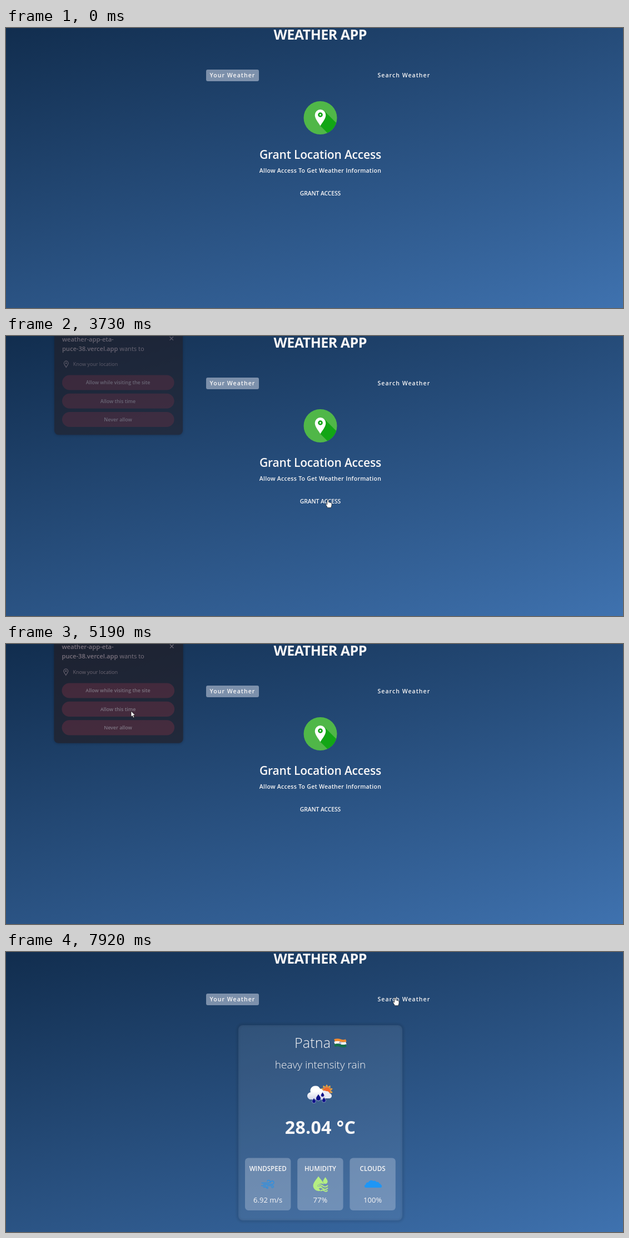
Write an HTML page that moves like this. It is 1110x505 px and loops after 8 s.

```html
<!DOCTYPE html>
<html lang="en">
<head>
<meta charset="utf-8">
<title>Weather App</title>
<style>
  html, body { margin: 0; width: 100%; height: 100%; overflow: hidden; }
  body { background: linear-gradient(160deg, #112d4e 0%, #3f72af 100%); }
  svg { display: block; width: 100%; height: 100%; }
  text { font-family: "Open Sans", "Noto Sans", sans-serif; fill: #f9f7f7; white-space: pre; }
  .mid { text-anchor: middle; }
  .light { font-weight: 300; }
  .semi { font-weight: 600; }
  .bold { font-weight: 700; }
  .tab { font-size: 10.5px; letter-spacing: 1.05px; }
  .stat { font-size: 11.6px; }
  .value { font-size: 13px; }
  #popup text { fill: #f0d6de; }
  #popup .ask { font-size: 11.5px; }
  #popup .choice { font-size: 9.2px; }
</style>
</head>
<body>
<svg viewBox="0 0 1110 505" preserveAspectRatio="none">
  <defs>
    <clipPath id="disc"><circle cx="565.5" cy="162" r="30"/></clipPath>
    <linearGradient id="cloudShade" x2="0" y2="1">
      <stop offset=".4" stop-color="#fff"/><stop offset="1" stop-color="#cfd3e6"/>
    </linearGradient>
    <filter id="soft" x="-10%" y="-10%" width="120%" height="120%"><feGaussianBlur stdDeviation="2"/></filter>
    <path id="drop" d="M0-5C1.500-2 4 0 4 2.200A4 4 0 0 1-4 2.200C-4 0-1.500-2 0-5Z"/>
  </defs>

  <text class="mid bold" x="565.3" y="20.800" font-size="25" letter-spacing="-.5">WEATHER APP</text>
  <rect x="360" y="75" width="95" height="21" rx="3" fill="#dbe2ef" fill-opacity=".5"/>
  <text class="tab semi" x="366.500" y="89">Your Weather</text>
  <text class="tab semi" x="668.500" y="89">Search Weather</text>

  <g id="grant">
    <circle cx="565.5" cy="162" r="30" fill="#50b748"/>
    <path clip-path="url(#disc)" fill="#12a615" d="M572.500 149.500 605 182 585 196 565.500 176.500Z"/>
    <path fill="#fff" d="M565.500 176.500C562 170.500 555.700 164 555.700 156.800A9.800 9.800 0 0 1 575.300 156.800C575.300 164 569 170.500 565.500 176.500Z"/>
    <circle cx="565.5" cy="156.500" r="2.900" fill="#fff" stroke="#12a615" stroke-width="2.800"/>
    <text class="mid semi" x="565.5" y="235.500" font-size="21" letter-spacing="-.18">Grant Location Access</text>
    <text class="mid semi" x="565.5" y="261" font-size="10.500" letter-spacing=".28">Allow Access To Get Weather Information</text>
    <text class="mid semi" x="565.5" y="302" font-size="10.400" letter-spacing="-.1">GRANT ACCESS</text>
  </g>

  <g id="loading">
    <g id="rings" fill="none"></g>
    <text class="mid semi" x="565.5" y="255.500" font-size="11.500" letter-spacing=".15">LOADING</text>
  </g>

  <g id="card">
    <rect x="417" y="131" width="297" height="354" rx="9" fill="none" stroke="#001" stroke-opacity=".16" stroke-width="3" filter="url(#soft)"/>
    <rect x="418" y="132" width="295" height="352" rx="8" fill="#dbe2ef" fill-opacity=".09"/>
    <text class="light" x="519" y="173" font-size="25" letter-spacing=".2">Patna</text>
    <g id="flag" fill="none" stroke-width="4.700"></g>
    <circle cx="601" cy="164.300" r="1.700" fill="none" stroke="#3b3f9a" stroke-width=".8"/>
    <text class="mid light" x="565.5" y="209.500" font-size="19">heavy intensity rain</text>

    <g id="sun" fill="#f2a33c"></g>
    <circle cx="577" cy="250" r="6.800" fill="#ee6a2c" stroke="#f7b04c"/>
    <path fill="#e9ebf5" d="M567 264a5 5 0 0 1 0-10 6 6 0 0 1 9-3 5.500 5.500 0 0 1 6 4 4.500 4.500 0 0 1-1 9Z"/>
    <path fill="url(#cloudShade)" d="M549 266a6.500 6.500 0 0 1-1-13 8.500 8.500 0 0 1 8-11.500 8.500 8.500 0 0 1 9 5 6.500 6.500 0 0 1 6 6.500 6.500 6.500 0 0 1-5 13Z"/>
    <g fill="#0b0f86" stroke="#fff" stroke-width=".5">
      <use href="#drop" transform="translate(554 267.500) scale(.85)"/>
      <use href="#drop" transform="translate(562 261.500) scale(1.100)"/>
      <use href="#drop" transform="translate(572 266) scale(.85)"/>
      <use href="#drop" transform="translate(569.500 256.500) scale(.75)"/>
    </g>
    <text class="mid bold" x="565.5" y="327.500" font-size="32" letter-spacing=".35">28.04 °C</text>

    <g id="stats"></g>
    <g fill="none" stroke="#2f8fdf" stroke-width="1.300" stroke-linecap="round">
      <path d="M460 416.500h12.500a2.500 2.500 0 1 0-2.500-2.600M463 419h16a3 3 0 1 0-3-3.200M459.500 421.500h8M470 421.500h9.500a1.800 1.800 0 1 1-1.800 2M463 424h7a1.300 1.300 0 1 1-1.300 1.400"/>
    </g>
    <g fill="#b4ee82">
      <path d="M562 404.500C565 409 571 414.500 572 419.500 568 416 563.500 418.500 560.500 420.500V423C563 423 566 420.500 569 423L562 425.500 566 430.500A10 10 0 0 1 552.500 422C552.500 415.500 559 409.500 562 404.500Z"/>
      <path d="M574.500 406C576 409 578.700 411 578.700 414A4.200 4.200 0 0 1 570.300 414C570.300 411 573 409 574.500 406Z"/>
      <path fill="none" stroke="#b4ee82" stroke-width="2" d="M561 422q4.500-4 9 0t9-1M561 426.500q4.500-4 9 0t9-1M566 431q3.500-3 6.500-.5t6-.5"/>
    </g>
    <path fill="#1e96f5" d="M647 425a2.800 2.800 0 0 1 .2-5.500 4 4 0 0 1 4.800-4 5.500 5.500 0 0 1 8.500-2.500 4.500 4.500 0 0 1 6 2 3.500 3.500 0 0 1 5 2.500 3 3 0 0 1 3 2.500 2.600 2.600 0 0 1-.5 5Z"/>
  </g>

  <g id="popup">
    <g id="panel">
      <rect x="82.500" y="-30" width="240" height="212.800" rx="8" fill="#000" opacity=".3" filter="url(#soft)"/>
      <rect x="83" y="-30" width="239" height="211.500" rx="8" fill="#231a1d"/>
    </g>
    <g id="content">
      <text class="ask semi" x="97.500" y="7">weather-app-eta-</text>
      <text class="ask" x="97.500" y="24.700"><tspan class="semi">puce-38.vercel.app</tspan> wants to</text>
      <path d="M297.700-1.500l6.600 6.600m0-6.600l-6.600 6.600" stroke="#e3ccd4" stroke-width="1.100"/>
      <path d="M105 55.500C103.500 52.500 101 50.500 101 47.800A4 4 0 0 1 109 47.800C109 50.500 106.500 52.500 105 55.500Z" fill="none" stroke="#d9c2ca" stroke-width="1.100"/>
      <circle cx="105" cy="47.800" r="1.300" fill="#d9c2ca"/>
      <text x="118" y="53.200" font-size="9.300" opacity=".85">Know your location</text>
      <g id="choices"></g>
    </g>
  </g>

  <g id="cursor" stroke="#111" stroke-linejoin="round" fill="#fff">
    <path id="arrow" stroke-width=".7" d="M0 0V10.300L2.400 8.200 4.100 12 5.800 11.200 4.200 7.600H7.400Z"/>
    <path id="hand" stroke-width=".7" d="M-1.300 1.200Q0-.8 1.300 1.200V5Q2.800 4.100 3.400 5.400 4.800 4.700 5.300 6 7 5.500 7 7.400V10.500Q6.500 12.500 5.600 14.700H-.6Q-1.500 12.300-3.600 9.500-4.300 7.700-2.700 7.800L-1.300 9Z"/>
  </g>
</svg>
<script>
const LOOP = 8000;
const $ = id => document.getElementById(id);
const clamp = v => Math.max(0, Math.min(1, v));
const show = (id, on) => $(id).setAttribute("display", on ? "inline" : "none");

function add(parent, name, attrs, text = "") {
  const el = document.createElementNS("http://www.w3.org/2000/svg", name);
  for (const key in attrs) el.setAttribute(key, attrs[key]);
  el.textContent = text;
  return $(parent).appendChild(el);
}

["Allow while visiting the site", "Allow this time", "Never allow"].forEach((label, i) => {
  const y = 70 + i * 34.4;
  add("choices", "rect", { x: 97.5, y, width: 208.5, height: 28, rx: 14, fill: "#723145" });
  add("choices", "text", { class: "mid choice semi", x: 201.5, y: y + 17.4 }, label);
});

[["WINDSPEED", "6.92 m/s"], ["HUMIDITY", "77%"], ["CLOUDS", "100%"]].forEach(([label, value], i) => {
  const x = 430 + i * 94.2;
  add("stats", "rect", { x, y: 371.5, width: 82.4, height: 94.5, rx: 6, fill: "#dbe2ef", "fill-opacity": .3 });
  add("stats", "text", { class: "mid stat semi", x: x + 41.2, y: 394.8 }, label);
  add("stats", "text", { class: "mid value", x: x + 41.2, y: 451.6 }, value);
});

["#f28a2e", "#fff", "#14704a"].forEach((stroke, i) =>
  add("flag", "path", { stroke, d: `M591 ${159.5 + i * 4.6}q5.200-2 10.400 0t10.400 0` }));

for (let a = 0; a < 360; a += 36)
  add("sun", "path", { d: "M-2.500-7.500L0-11.300 2.500-7.500Z", transform: `translate(577 250) rotate(${a})` });

// radius, width, colour, arc start in degrees, arc length, degrees per ms
const rings = [
  [27.7, 4.6, "#5cb85c", -46, 332, .24],
  [21, 3.6, "#4fbdb0", 146, 322, -.3],
  [14.5, 2.4, "#4fb0d6", -20, 313, .36],
].map(([r, width, stroke, start, arc, speed]) => {
  const length = 2 * Math.PI * r * arc / 360;
  const el = add("rings", "circle", { r, stroke, "stroke-width": width, "stroke-dasharray": `${length} 999` });
  return { el, start, speed };
});

// Pointer hot spot: time, x, y
const route = [
  [120, 938, 487], [720, 668, 425], [1250, 668, 425], [1590, 586, 307], [1720, 579, 295],
  [4130, 579, 295], [4720, 234, 96], [4990, 224, 119], [5190, 225, 121], [5790, 229, 136],
  [6190, 400, 260], [7390, 400, 260], [7920, 700, 82],
];

function pointerAt(t) {
  const i = route.findIndex(p => p[0] > t);
  if (i < 0) return route[route.length - 1].slice(1);
  const [t0, x0, y0] = route[i - 1], [t1, x1, y1] = route[i];
  const u = (t - t0) / (t1 - t0), k = u * u * (3 - 2 * u);
  return [x0 + (x1 - x0) * k, y0 + (y1 - y0) * k];
}

function drawPointer(t) {
  show("cursor", t >= 120);
  if (t < 120) return;
  const [x, y] = pointerAt(t);
  const onGrant = t < 5400 && x > 520 && x < 612 && y > 284 && y < 313;
  const onTab = x > 662 && x < 770 && y > 75 && y < 97;
  show("hand", onGrant || onTab);
  show("arrow", !(onGrant || onTab));
  $("cursor").setAttribute("transform", `translate(${x} ${y})`);
}

function drawPopup(t) {
  const visible = t >= 3730 && t < 5280;
  show("popup", visible);
  if (!visible) return;
  const p = t < 4500 ? clamp(.35 + (t - 3730) / 200) : clamp(1 - (t - 5080) / 200);
  const scale = .949 + .051 * p;
  $("popup").setAttribute("transform", `translate(202.5 84) scale(${scale}) translate(-202.5 -84)`);
  $("panel").setAttribute("opacity", p ** .6);
  $("content").setAttribute("opacity", p);
}

function render(t) {
  show("grant", t < 5420);
  show("loading", t >= 5420 && t < 5860);
  show("card", t >= 5860);
  for (const { el, start, speed } of rings)
    el.setAttribute("transform", `translate(568.5 192.5) rotate(${start + (t - 5790) * speed})`);
  drawPopup(t);
  drawPointer(t);
}

const begin = performance.now();
function tick() {
  render((performance.now() - begin) % LOOP);
  requestAnimationFrame(tick);
}
tick();
</script>
</body>
</html>
```
